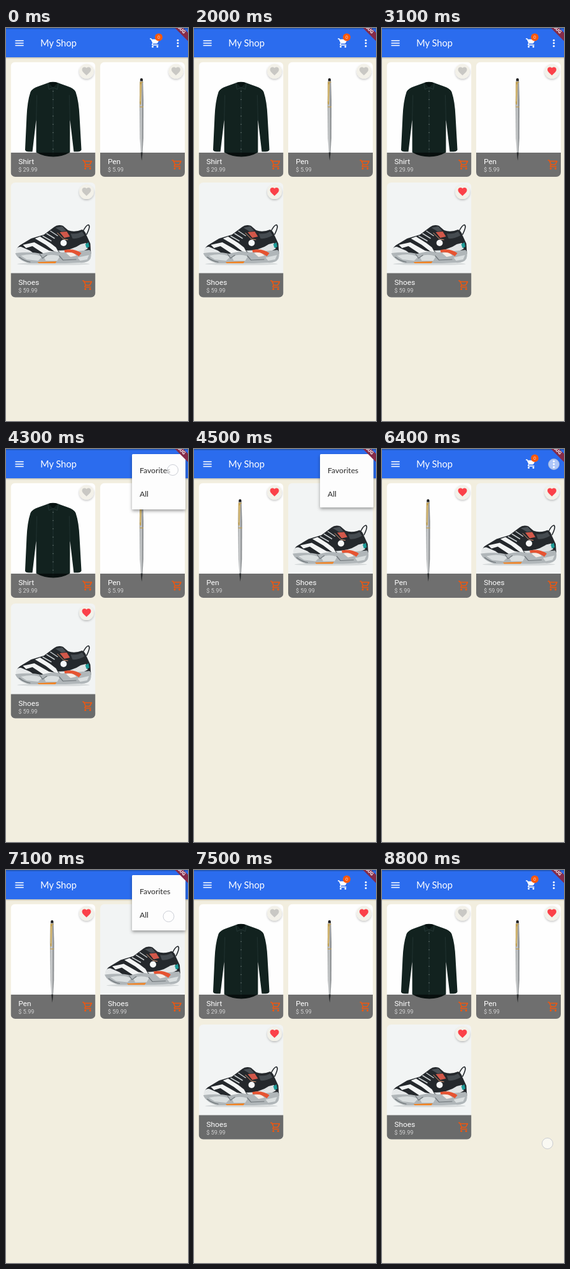
An HTML page for the animation above (8.9 s loop, 286x618 px).

```html
<!DOCTYPE html>
<html lang="en">
<head>
<meta charset="utf-8">
<title>My Shop</title>
<style>
  html, body { margin: 0; width: 100%; height: 100%; overflow: hidden; background: #f2eedf; }
  svg { display: block; width: 286px; height: 618px; }
  .bar { font: 14.7px Lato, sans-serif; fill: #fff; }
  .item { font: 12.2px Lato, sans-serif; fill: #2b2b2b; }
  .name { font: 11.8px Roboto, sans-serif; fill: #fff; }
  .price { font: 9px Roboto, sans-serif; fill: #d2d2d2; }
  .badge { font: 7px Roboto, sans-serif; fill: #ffd9c4; text-anchor: middle; }
  .debug { font: bold 7.4px Roboto, sans-serif; fill: #fff; text-anchor: end; }
</style>
</head>
<body>
<svg viewBox="0 0 286 618">
  <defs>
    <clipPath id="round"><rect width="133" height="180.5" rx="7"/></clipPath>
    <clipPath id="menuClip"><rect id="menuArea" x="198" y="8" width="84" height="87"/></clipPath>
    <filter id="soft" x="-40%" y="-40%" width="180%" height="180%">
      <feDropShadow dx="0" dy="1.6" stdDeviation="1.6" flood-color="#000" flood-opacity=".24"/>
    </filter>
    <filter id="deep" x="-20%" y="-20%" width="140%" height="140%">
      <feDropShadow dx="0" dy="2.5" stdDeviation="2.6" flood-color="#000" flood-opacity=".38"/>
    </filter>
    <linearGradient id="under" x2="0" y2="1">
      <stop stop-color="#000" stop-opacity=".2"/><stop offset="1" stop-color="#000" stop-opacity="0"/>
    </linearGradient>
    <linearGradient id="steel">
      <stop stop-color="#85898b"/><stop offset=".35" stop-color="#d2d4d5"/>
      <stop offset=".6" stop-color="#aeb1b3"/><stop offset="1" stop-color="#74787b"/>
    </linearGradient>
    <path id="heart" d="M12 21.35l-1.45-1.32C5.4 15.36 2 12.28 2 8.5 2 5.42 4.42 3 7.5 3c1.74 0 3.41.81 4.5 2.09C13.09 3.81 14.76 3 16.5 3 19.58 3 22 5.42 22 8.5c0 3.78-3.4 6.86-8.55 11.54z"/>
    <path id="wheels" d="M7 18a2 2 0 1 0 0 4a2 2 0 1 0 0-4zM17 18a2 2 0 1 0 0 4a2 2 0 1 0 0-4z"/>
    <path id="cart" d="M1 2v2h2l3.6 7.59-1.35 2.45C4.5 15.4 5.5 17 7 17h12v-2H7.42c-.14 0-.25-.11-.25-.25l.03-.12.9-1.63h7.45c.75 0 1.41-.41 1.75-1.03l3.58-6.49C21.2 4.8 20.7 4 20 4H5.21l-.94-2z"/>
    <path id="openCart" fill-rule="evenodd" d="M15.55 13c.75 0 1.41-.41 1.75-1.03l3.58-6.49C21.2 4.8 20.7 4 20 4H5.21l-.94-2H1v2h2l3.6 7.59-1.35 2.45C4.5 15.4 5.5 17 7 17h12v-2H7l1.1-2zM6.16 6h12.15l-2.76 5H8.53z"/>

    <g id="shirt">
      <path fill="#12221f" d="M58 33Q66 30 75 33L89 38Q99 41 102 47Q107 62 108 85L111 138Q110 141 105 141L99 141L93 90L93 142Q81 149 67 149Q52 149 40 142L40 90L34 141L28 141Q23 141 22.500 138L25 85Q26 62 31 47Q34 41 44 38Z"/>
      <path fill="none" stroke="#253735" stroke-width=".8" d="M66.500 41V148M41 52L40 92M92 52L93 92"/>
      <path fill="#071211" d="M59 32.500Q66 30 74 32.500L66.500 40Z"/>
      <path fill="none" stroke="#2a3d3b" stroke-width=".8" d="M58 33L60 43L66.500 40L73 43L75 33"/>
      <path fill="none" stroke="#7b8884" stroke-width="1.3" stroke-linecap="round" stroke-dasharray="0 13" d="M66.500 46V141"/>
    </g>

    <g id="pen">
      <path fill="url(#steel)" d="M62.500 30H67.200L68 60L67.800 120L66.400 146L65.200 155L64 146L62.400 120L61.800 60Z"/>
      <path fill="#1c1d1f" d="M62.800 30V27.500Q62.800 25.500 64.900 25.500Q67 25.500 67 27.500V30Z"/>
      <path fill="#5d6265" d="M63.800 142H66.600L65.200 155Z"/>
      <path fill="#c2a052" d="M62.200 31H67.300V32.500H65.500L64.200 66Q63 69 62 65ZM61.900 70H68V71.200H61.900Z"/>
      <path stroke="#ead9a4" stroke-width=".7" d="M63.800 35L63 62"/>
    </g>

    <g id="shoes">
      <ellipse cx="67" cy="128" rx="57" ry="2" fill="#d4d8d9"/>
      <path fill="none" stroke="#24292d" stroke-width="1.600" d="M113 78Q118 67 122 66.500Q126 68 119 82"/>
      <path fill="#24282c" d="M9 108Q9 101 17 97L32 88L52 82L68 70Q74 65 82 68L90 75Q100 79 112 74Q117 76 119 83L125 96L126 112Q104 116 82 112L15 114Z"/>
      <path fill="#e6e9ea" d="M8 106Q10 101 16 101L30 107L40 114L13 115Q7 113 8 106Z"/>
      <path fill="#f2f4f4" d="M19 98L37 94L60 107L70 109L66 114L52 112L34 100L24 103ZM38 88L46 85L62 95L71 102L76 111L68 108L55 98Z"/>
      <path fill="none" stroke="#c8cdcf" stroke-width="1.500" d="M50 84L64 92M56 80L69 88M62 76L74 84"/>
      <path fill="#4b5156" d="M70 71L81 69L87 76L80 77Z"/>
      <path fill="#d2584a" d="M77 78L88 77L93 85L84 87Z"/>
      <path fill="none" stroke="#e8a07c" stroke-width="1" d="M73 79L83 89L90 90"/>
      <path fill="#454b50" d="M94 80Q104 82 112 77L116 83Q106 89 97 88Z"/>
      <path fill="#dfe3e4" d="M74 107Q96 107 110 97L118 95L121 104L108 111L82 113Z"/>
      <path fill="#1d9c98" d="M117 97L122 94L123.500 101L119 103Z"/>
      <circle cx="83" cy="95" r="5" fill="#f7f8f8"/>
      <path fill="#b0b6b9" d="M7 111Q31 108 48 112Q66 106 81 110L124 106Q128 111 125 120Q121 127 108 126L86 127L29 127Q11 122 7 111Z"/>
      <path fill="#d9dedf" d="M16 115Q37 110 49 117L43 123L25 121ZM52 117Q62 111 77 116L73 123L55 123ZM105 118L123 114L120 121L109 123Z"/>
      <path fill="#e65331" d="M84 106Q100 103 111 111L107 116Q96 108 85 110Z"/>
      <path fill="#f5ece5" d="M87 111Q97 108 103 115L94 117Z"/>
      <path fill="none" stroke="#6d7478" stroke-width="1.2" d="M13 117Q22 124 31 125M45 112L50 119L57 114M76 115L82 122L103 121"/>
      <path fill="#f18425" d="M42 125L72 124L70 127L44 127Z"/>
    </g>
  </defs>

  <rect width="286" height="618" fill="#f2eedf"/>
  <g id="grid"></g>

  <rect y="46" width="286" height="3" fill="url(#under)"/>
  <rect width="286" height="46" fill="#2b6cee"/>
  <rect width="286" height="2" fill="#2459bd"/>
  <path d="M14.500 20H27.700M14.500 23.700H27.700M14.500 27.400H27.700" stroke="#fff" stroke-width="1.500"/>
  <text class="bar" x="54" y="29.300">My Shop</text>
  <g fill="#fff" transform="translate(225.300 14.800) scale(.74)"><use href="#cart"/><use href="#wheels"/></g>
  <circle cx="240" cy="14.500" r="6" fill="#fa580d"/>
  <text class="badge" x="240" y="17">0</text>
  <g fill="#fff"><circle cx="270" cy="19.200" r="1.500"/><circle cx="270" cy="23.800" r="1.500"/><circle cx="270" cy="28.400" r="1.500"/></g>

  <g id="menu">
    <rect id="sheet" x="198" y="8" width="84" height="87" rx="1.500" fill="#fdfdfd" filter="url(#deep)"/>
    <g clip-path="url(#menuClip)">
      <text class="item" x="210" y="37.500">Favorites</text>
      <text class="item" x="210" y="74.500">All</text>
    </g>
  </g>

  <path d="M265.500 0H278.500L286 7.500V20.500Z" fill="#852b49"/>
  <text class="debug" transform="translate(279.300 9.300) rotate(45)">DEBUG</text>
  <circle id="touch" r="8.500" fill="#fff" fill-opacity=".62" stroke="#b9bcc6" stroke-opacity=".8" stroke-width=".9"/>
</svg>

<script>
const LOOP = 8900, STEP = 100;
const $ = id => document.getElementById(id);
const products = [
  { id: 'shirt', name: 'Shirt', price: '29.99', back: '#fefefe', liked: Infinity },
  { id: 'pen', name: 'Pen', price: '5.99', back: '#fefefe', liked: 2400 },
  { id: 'shoes', name: 'Shoes', price: '59.99', back: '#f2f4f4', liked: 1200 }
];
const favorites = { from: 4400, to: 7200 };
const menus = [{ open: 3600, close: 4400 }, { open: 6500, close: 7200 }];
// from, to, x, y and the y reached at the end
const touches = [
  [1000, 1200, 127, 257, 257],
  [2300, 2500, 267, 68, 68],
  [3500, 3700, 270, 24, 24],
  [4200, 4500, 262, 33, 33],
  [6400, 6600, 270, 24, 24],
  [7000, 7300, 255.5, 73, 73],
  [8500, 8900, 260, 440, 430]
];

$('grid').innerHTML = products.map(p => `
  <g id="card-${p.id}">
    <g clip-path="url(#round)">
      <rect width="133" height="181" fill="${p.back}"/>
      <use href="#${p.id}"/>
      <rect y="142.500" width="133" height="39" fill="#000" fill-opacity=".56"/>
    </g>
    <text class="name" x="12" y="160.500">${p.name}</text>
    <text class="price" x="12" y="172.500">$ ${p.price}</text>
    <g fill="#f1570e" transform="translate(111.800 152.300) scale(.76)"><use href="#openCart"/><use href="#wheels"/></g>
    <circle cx="119" cy="14.500" r="11.500" fill="#f3f1e9" filter="url(#soft)"/>
    <use id="like-${p.id}" href="#heart" transform="translate(110.600 6) scale(.7)"/>
  </g>`).join('');

const clamp = v => Math.max(0, Math.min(1, v));
const ease = v => 1 - (1 - v) ** 3;

function set(id, attrs) {
  for (const key in attrs) $(id).setAttribute(key, attrs[key]);
}

function drawCards(t) {
  const filtered = t >= favorites.from && t < favorites.to;
  let slot = 0;
  for (const p of products) {
    const shown = !filtered || p.liked < t;
    set('card-' + p.id, {
      display: shown ? 'inline' : 'none',
      transform: `translate(${slot % 2 ? 148 : 7.5} ${slot > 1 ? 243 : 53.5})`
    });
    set('like-' + p.id, { fill: t >= p.liked ? '#fb4149' : '#c9c8c4' });
    if (shown) slot++;
  }
}

function drawMenu(t) {
  let grow = 0;
  for (const m of menus)
    if (t >= m.open) grow = Math.min(clamp((t - m.open) / 300), 1 - clamp((t - m.close) / 300));
  const width = 84 * ease(clamp(grow * 1.5));
  const height = 87 * ease(grow);
  const box = { x: 282 - width, width, height };
  set('sheet', box);
  set('menuArea', box);
  set('menu', { opacity: clamp(grow * 3), display: grow ? 'inline' : 'none' });
}

function drawTouch(t) {
  const hit = touches.find(([from, to]) => t >= from && t < to);
  set('touch', { display: hit ? 'inline' : 'none' });
  if (!hit) return;
  const [from, , x, y, end] = hit;
  set('touch', { cx: x, cy: y + (end - y) * clamp((t - from) / 300) });
}

function draw(now) {
  const t = Math.floor(now % LOOP / STEP) * STEP;
  drawCards(t);
  drawMenu(t);
  drawTouch(t);
}

const start = performance.now();
function tick() {
  draw(performance.now() - start);
  requestAnimationFrame(tick);
}
tick();
</script>
</body>
</html>
```
